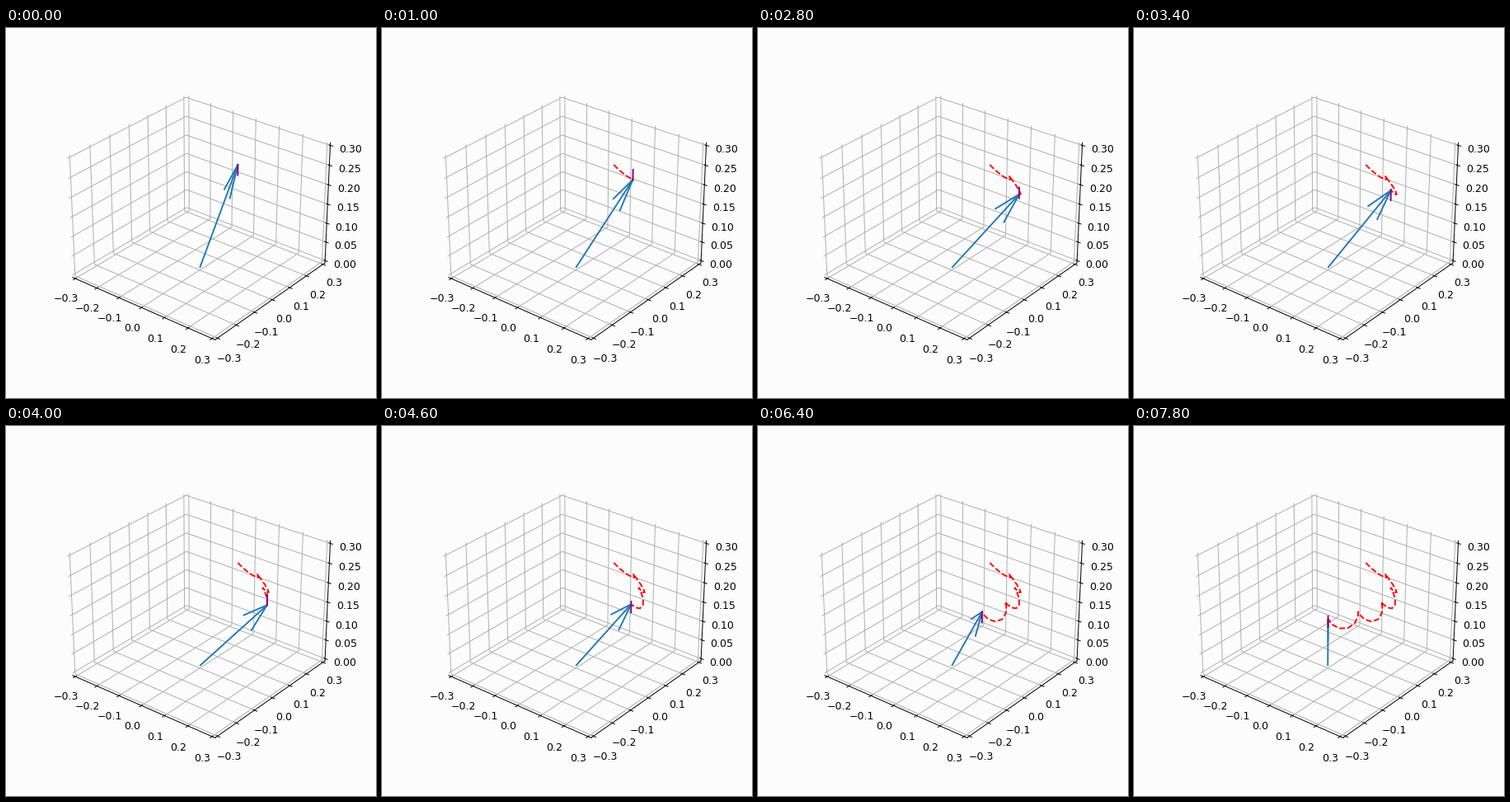
A matplotlib script for the animation above (8000 ms loop, 449 px wide and 449 px high).

```python
import numpy as np
import matplotlib.pyplot as plt
from matplotlib.animation import FuncAnimation

SIZE, DPI = 449, 89.8
FRAMES, INTERVAL = 40, 200

LENGTH = 0.3                   # length of the top's axis
TILT = np.radians(45)          # tilt at each cusp
NOD = np.radians(3.5)          # nutation amplitude
TURN = np.radians(28.4)        # precession per nutation
PERIOD, LAG = 8, 0.35          # nutation timing, in frames

Z_HIGH = LENGTH * np.cos(TILT)
Z_LOW = LENGTH * np.cos(TILT + 2 * NOD)


def tip(frame):
    """Tip of a heavy top released from rest, at one or many frames."""
    angle = 2 * np.pi * np.maximum(0, np.asarray(frame) - LAG) / PERIOD
    theta = TILT + NOD * (1 - np.cos(angle))
    phi = np.pi / 2 - TURN * (angle - np.sin(angle)) / (2 * np.pi)
    return (LENGTH * np.sin(theta) * np.cos(phi),
            LENGTH * np.sin(theta) * np.sin(phi),
            LENGTH * np.cos(theta))


def padded(low, high):
    pad = (high - low) / 48
    return low - pad, high + pad


fig = plt.figure(figsize=(SIZE / DPI, SIZE / DPI), dpi=DPI, facecolor="#fcfcfc")
ax = fig.add_axes([0.1259, 0.11, 0.775, 0.77], projection="3d",
                  computed_zorder=False)
ax.patch.set_visible(False)
ax.view_init(elev=28.65, azim=-51.4)
ax.set_xlim(*padded(-0.3, 0.3))
ax.set_ylim(*padded(-0.3, 0.3))
ax.set_zlim(*padded(0, 0.3))
ax.set_xticks(np.arange(-3, 4) / 10)
ax.set_yticks(np.arange(-3, 4) / 10)
ax.set_zticks(np.arange(7) / 20)
for axis in (ax.xaxis, ax.yaxis, ax.zaxis):
    axis.set_pane_color((1, 1, 1, 0))
    axis.pane.set_edgecolor("#f4f4f4")

trail, = ax.plot([], [], [], "--", color="red", lw=1.5, zorder=4)
span, = ax.plot([], [], [], color="purple", lw=1.5, zorder=5)
arrow = None


def draw(frame):
    global arrow
    x, y, z = (float(c) for c in tip(frame))
    if arrow is not None:
        arrow.remove()
    arrow = ax.quiver(0, 0, 0, x, y, z, color="C0", lw=1.5, zorder=3)
    trail.set_data_3d(*tip(np.arange(frame + 1)))
    span.set_data_3d([x, x], [y, y], [Z_LOW, Z_HIGH])
    return arrow, trail, span


def start():
    return draw(0)


anim = FuncAnimation(fig, draw, frames=FRAMES, init_func=start,
                     interval=INTERVAL, repeat=True, repeat_delay=0, blit=False)
plt.show()
```
